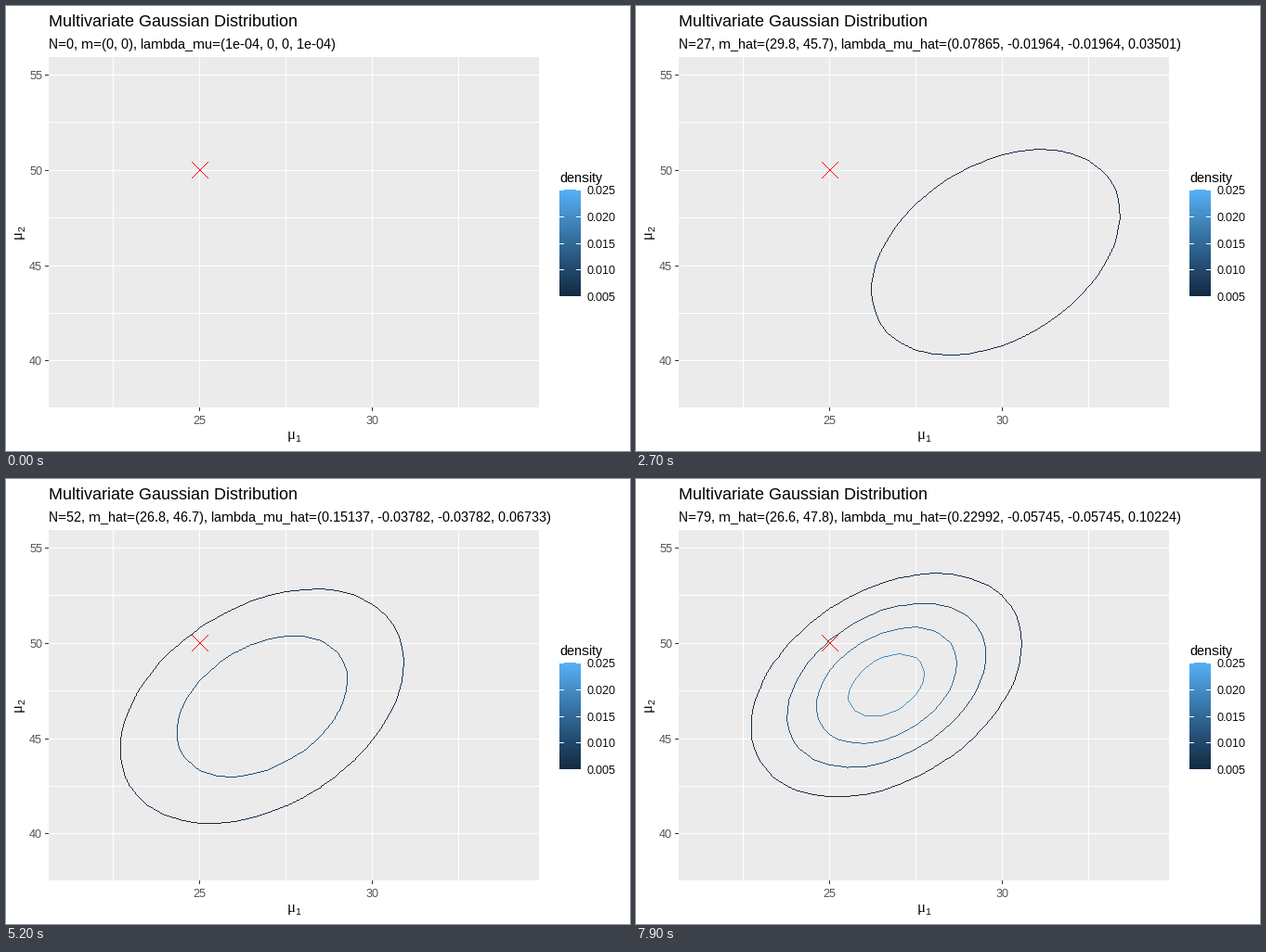
A matplotlib script that plays this animation: 672 by 480 pixels, repeating every 8000 ms.

```python
import numpy as np
import matplotlib.pyplot as plt
from matplotlib.animation import FuncAnimation
from matplotlib.colors import LinearSegmentedColormap, to_rgb

W, H, DPI = 672, 480, 96
FRAMES, STEP = 80, 100
LEVELS = (0.005, 0.010, 0.015, 0.020, 0.025)
BLUES = LinearSegmentedColormap.from_list(
    "blues", ["#132B43", "#22496C", "#326A98", "#448DC6", "#56B1F7"])
TITLE, BODY, SMALL, SUB = (18, 15, 12, 10)  # font sizes in pixels

# Known covariance of the samples and weak prior precision on the mean
PRECISION = np.linalg.inv([[400, 225], [225, 900]])
PRIOR = 1e-4 * np.eye(2)

# Sample count, mean of mu1, mean of mu2
WAYPOINTS = [
    (1, 31.0, 38.0), (18, 29.6, 45.1), (20, 29.7, 43.7), (27, 29.8, 45.7),
    (34, 29.7, 46.6), (36, 29.1, 44.5), (43, 26.5, 44.5), (45, 26.7, 45.4),
    (52, 26.8, 46.7), (55, 26.4, 46.1), (63, 25.5, 47.2), (72, 26.1, 46.9),
    (79, 26.64, 47.8),
]


def running_means():
    """Running sample means that pass through the waypoints."""
    rng = np.random.default_rng(4)
    means = np.zeros((FRAMES, 2))
    means[1] = WAYPOINTS[0][1:]
    for (n0, *m0), (n1, *m1) in zip(WAYPOINTS, WAYPOINTS[1:]):
        start, end = n0 * np.array(m0), n1 * np.array(m1)
        noise = rng.normal(0, (7, 9), (n1 - n0, 2))
        draws = noise - noise.mean(axis=0) + (end - start) / (n1 - n0)
        counts = np.arange(n0 + 1, n1 + 1)[:, None]
        means[n0 + 1:n1 + 1] = (start + draws.cumsum(axis=0)) / counts
    return means


def px(v):
    return 208.4 + 37.2 * (v - 25)


def py(v):
    return 176.8 - 20.56 * (v - 50)


def num(v, digits):
    return f"{round(float(v), digits):g}"


def stroke(img, points, color):
    """Hard-edged polyline, one pixel wide."""
    points = np.rint(points)
    for a, b in zip(points, points[1:]):
        n = int(abs(b - a).max()) + 1
        xs, ys = np.rint(np.linspace(a, b, n)).astype(int).T
        img[ys, xs] = to_rgb(color)


MEANS = running_means()
GX, GY = np.meshgrid(np.arange(19, 37, 0.5), np.arange(35, 59, 0.5))

plt.rcParams.update({
    "font.family": "Liberation Sans",
    "text.hinting": "native",
    "text.hinting_factor": 1,
    "text.kerning_factor": 6,
})
fig = plt.figure(figsize=(W / DPI, H / DPI), dpi=DPI, facecolor="white")
ax = fig.add_axes([0, 0, 1, 1])
base = np.ones((H, W, 3))


def label(x, y, s, size, color="black", **kw):
    return ax.text(x, y, s, fontsize=size * 72 / DPI, color=color,
                   va="baseline", **kw)


def draw_panel():
    base[55:433, 46:574] = to_rgb("#EBEBEB")
    for v in np.arange(22.5, 33, 2.5):
        x = px(v)
        stroke(base, [(x, 55), (x, 432)], "white")
        if v % 5 == 0:
            stroke(base, [(x, 433), (x, 436)], "#333333")
            label(x, 451, f"{v:.0f}", SMALL, "#4D4D4D", ha="center")
    for v in np.arange(40, 56, 2.5):
        y = py(v)
        stroke(base, [(46, y), (573, y)], "white")
        if v % 5 == 0:
            stroke(base, [(42, y), (45, y)], "#333333")
            label(39, np.rint(y) + 5, f"{v:.0f}", SMALL, "#4D4D4D",
                  ha="right")


def draw_titles():
    label(46, 22, "Multivariate Gaussian Distribution", TITLE)
    mu = dict(family="Liberation Serif")
    label(303, 467, "\u03bc", BODY + 1, **mu)
    label(311, 470, "1", SUB)
    turn = dict(rotation=90, rotation_mode="anchor")
    label(17, 251, "\u03bc", BODY + 1, **mu, **turn)
    label(20, 243, "2", SUB, **turn)


def draw_legend():
    label(596, 190, "density", BODY)
    base[198:313, 596:619] = BLUES(np.linspace(1, 0, 115))[:, None, :3]
    for i, level in enumerate(LEVELS):
        y = 313.2 - 28.75 * i
        stroke(base, [(596, y), (600, y)], "white")
        stroke(base, [(614, y), (618, y)], "white")
        label(626, np.rint(y) + 5, f"{level:.3f}", SMALL)


def draw_cross(img):
    x, y, r = px(25), py(50), 8.5
    stroke(img, [(x - r, y - r), (x + r, y + r)], "red")
    stroke(img, [(x - r, y + r), (x + r, y - r)], "red")


def density(mean, lam):
    dx, dy = GX - mean[0], GY - mean[1]
    q = lam[0, 0] * dx**2 + 2 * lam[0, 1] * dx * dy + lam[1, 1] * dy**2
    return np.sqrt(np.linalg.det(lam)) / (2 * np.pi) * np.exp(-q / 2)


def draw_contours(img, z):
    levels = [v for v in LEVELS if v < z.max()]
    if not levels:
        return
    rings = ax.contour(px(GX), py(GY), z, levels=levels)
    for level, paths in zip(levels, rings.allsegs):
        for path in paths:
            stroke(img, path, BLUES((level - 0.005) / 0.02))
    rings.remove()


draw_panel()
draw_titles()
draw_legend()
subtitle = label(46, 46, "", BODY)
canvas = ax.imshow(base, extent=(0, W, H, 0), aspect="auto",
                   interpolation="nearest", zorder=0)
ax.axis("off")


def update(n):
    img = base.copy()
    if n == 0:
        text = "N=0, m=(0, 0), lambda_mu=(1e-04, 0, 0, 1e-04)"
    else:
        mean, lam = MEANS[n], PRIOR + n * PRECISION
        m_text = ", ".join(num(v, 1) for v in mean)
        l_text = ", ".join(num(v, 5) for v in lam.flat)
        text = f"N={n}, m_hat=({m_text}), lambda_mu_hat=({l_text})"
        draw_contours(img, density(mean, lam))
    draw_cross(img)
    subtitle.set_text(text)
    canvas.set_data(img)
    ax.set_xlim(0, W)
    ax.set_ylim(H, 0)
    return []


anim = FuncAnimation(fig, update, frames=FRAMES, interval=STEP,
                     init_func=lambda: update(0), repeat=True,
                     repeat_delay=0, blit=False)
plt.show()
```
